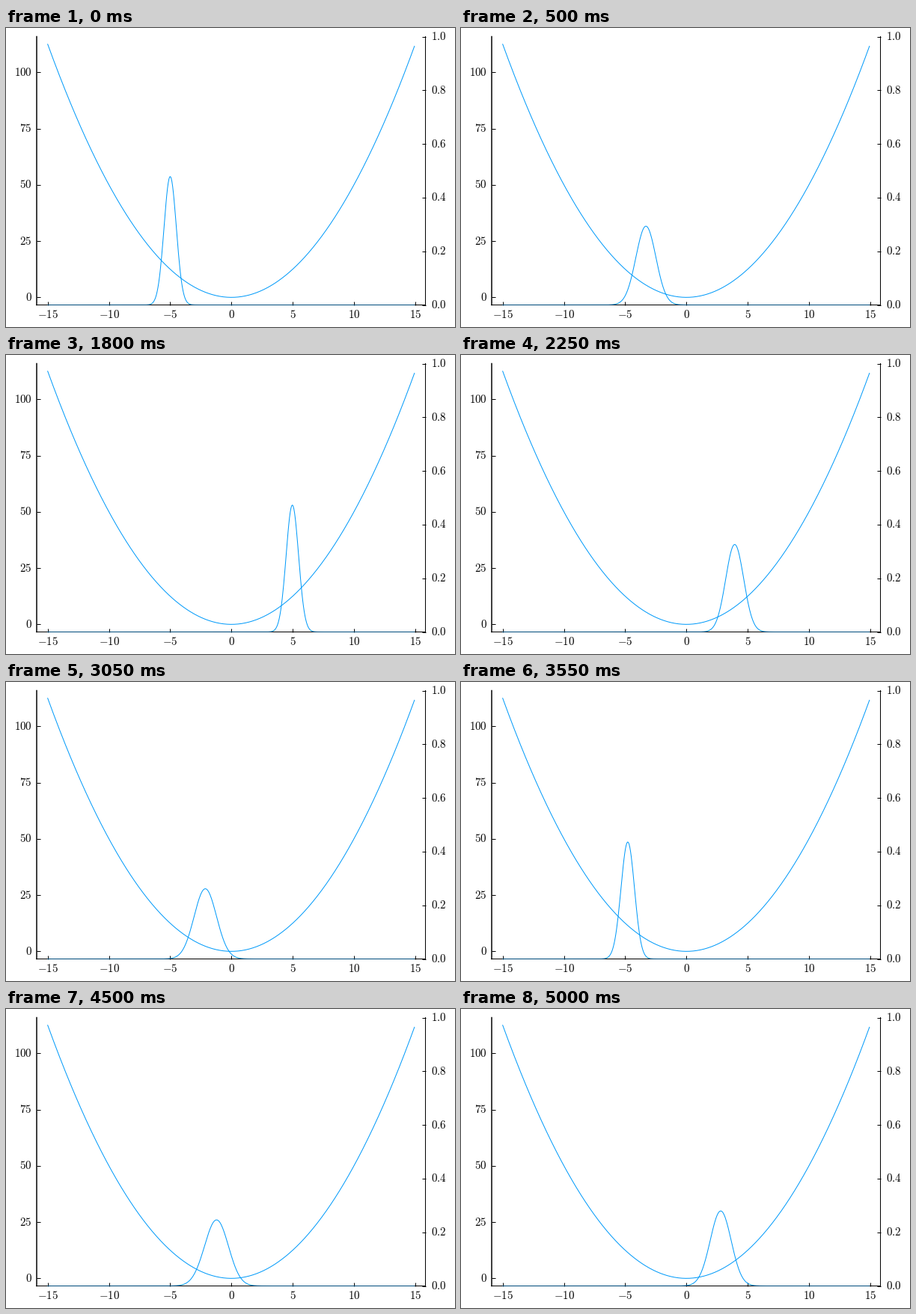
Write a matplotlib script that moves like this. It is 600 by 400 pixels and loops after 5.05 s.

```python
import numpy as np
import matplotlib.pyplot as plt
from matplotlib.animation import FuncAnimation

W, H, DPI = 600, 400, 100
PX = 72 / DPI            # one pixel in points
BLUE = "#009AFA"
FRAMES, INTERVAL = 101, 50
STEP = 0.085             # physical time per frame
LEFT, RIGHT, TOP, BOTTOM = 41, 560.5, 11.5, 370.5

# Harmonic oscillator on a finite-difference grid
DX = 0.06
x = -15 + DX * np.arange(500)
V = x**2 / 2
hop = np.full(len(x) - 1, -0.5 / DX**2)
energy, modes = np.linalg.eigh(
    np.diag(V + 1 / DX**2) + np.diag(hop, 1) + np.diag(hop, -1))

psi0 = np.exp(-(x + 5)**2)
psi0 /= np.linalg.norm(psi0)
coef = modes.T @ psi0


def density(t):
    psi = modes @ (coef * np.exp(-1j * energy * t))
    return 10 * np.abs(psi)**2


def padded(lo, hi, pad=0.03):
    d = pad * (hi - lo)
    return lo - d, hi + d


def style(ax, widths):
    """Show the sides named in widths, with line widths in pixels."""
    for side, spine in ax.spines.items():
        spine.set_visible(side in widths)
        spine.set_linewidth(widths.get(side, 1) * PX)
        spine.set_snap(False)
    ax.patch.set_visible(False)


def set_ticks(axis, values, pad, fmt="{}", **text):
    axis.set_ticks(values, ["$" + fmt.format(v) + "$" for v in values], **text)
    axis.set_tick_params(direction="in", length=5 * PX, width=PX,
                         labelsize=15 * PX, pad=pad * PX)
    for mark in axis.get_ticklines():
        mark.set_snap(False)


plt.rcParams["mathtext.fontset"] = "cm"
fig = plt.figure(figsize=(W / DPI, H / DPI), dpi=DPI, facecolor="white")
box = [LEFT / W, 1 - BOTTOM / H, (RIGHT - LEFT) / W, (BOTTOM - TOP) / H]

ax = fig.add_axes(box)
style(ax, {"left": 1.5, "bottom": 1})
ax.set_xlim(*padded(x[0], x[-1]))
ax.set_ylim(*padded(0, V.max()))
set_ticks(ax.xaxis, range(-15, 16, 5), 5.3)
set_ticks(ax.yaxis, range(0, 101, 25), 6.5, va="center")
ax.plot(x, V, color=BLUE, lw=PX, snap=False)

twin = fig.add_axes(box)
style(twin, {"right": 1, "bottom": 1})
twin.spines["bottom"].set_alpha(0.5)    # darkens the flat part of the wave
twin.set_xlim(ax.get_xlim())
twin.set_ylim(0, 1)
twin.set_xticks([])
twin.yaxis.tick_right()
set_ticks(twin.yaxis, np.arange(6) / 5, 8, "{:.1f}", va="center")
wave, = twin.plot(x, density(0), color=BLUE, lw=PX, snap=False)


def update(i):
    wave.set_data(x, density(i * STEP))
    return wave,


anim = FuncAnimation(fig, update, frames=FRAMES, interval=INTERVAL,
                     repeat=True, repeat_delay=0, blit=False)
plt.show()
```
